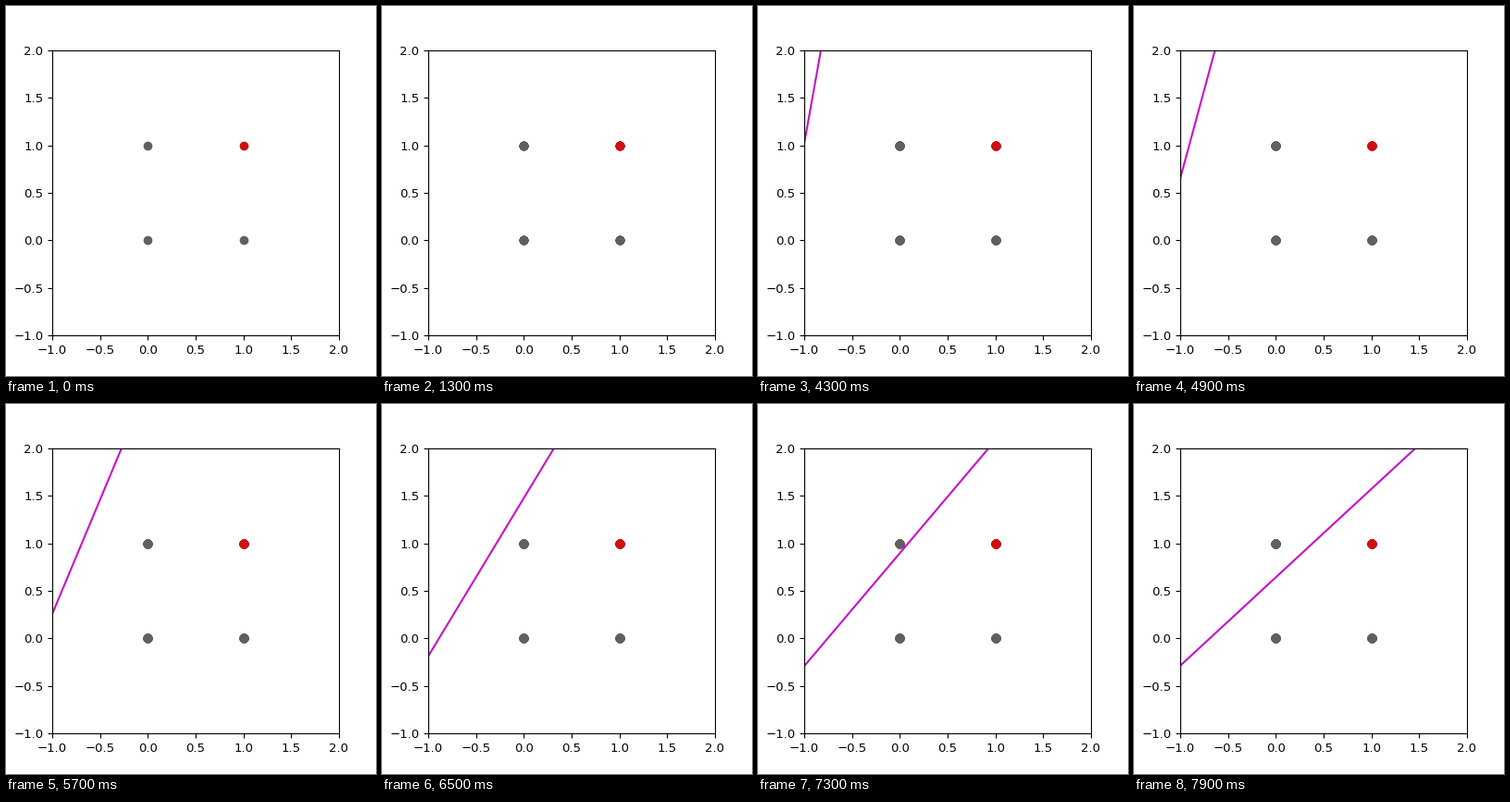
Animation, 400 px wide and 400 px high, one loop 8 s. Source, as a matplotlib script:

```python
import numpy as np
import matplotlib.pyplot as plt
from matplotlib.animation import FuncAnimation

FRAMES, INTERVAL = 80, 100
GRAY, RED, PURPLE = "#606060", "#cc1010", "#c810c8"

plt.rcParams["font.family"] = "DejaVu Sans"

fig, ax = plt.subplots(figsize=(4, 4), dpi=100)
ax.set(xlim=(-1, 2), ylim=(-1, 2))
ticks = np.arange(-1, 2.1, 0.5)
ax.set_xticks(ticks)
ax.set_yticks(ticks)
ax.tick_params(labelsize=9.5)

# Corners of the unit square; only (1, 1) is the positive class
grid = [(x, y) for x in (0, 1) for y in (0, 1)]
classes = [([p for p in grid if all(p) == label], color)
           for label, color in ((False, GRAY), (True, RED))]
groups = [(pts, ax.scatter(*zip(*pts), color=color)) for pts, color in classes]

line, = ax.plot([], [], color=PURPLE, lw=1.5)
ys = np.array([-2, 3])


def boundary(i):
    """Line (w - 1) x + w y + bias = 0, with both terms learned over time."""
    w = max(0, 0.212 + 0.0102 * (i - 49))
    t = i - 61
    bias = -0.668 + 0.012 * t + 0.12 * np.tanh(t / 6.5)
    return (w * ys + bias) / (1 - w), ys


def update(i):
    # Dots are stamped again on every step, which hardens their edges
    for pts, dots in groups:
        dots.set_offsets(np.tile(pts, (i + 1, 1)))
    line.set_data(*boundary(i))
    return [dots for _, dots in groups] + [line]


anim = FuncAnimation(fig, update, frames=FRAMES, interval=INTERVAL,
                     repeat=True, repeat_delay=0, blit=False)
plt.show()
```
